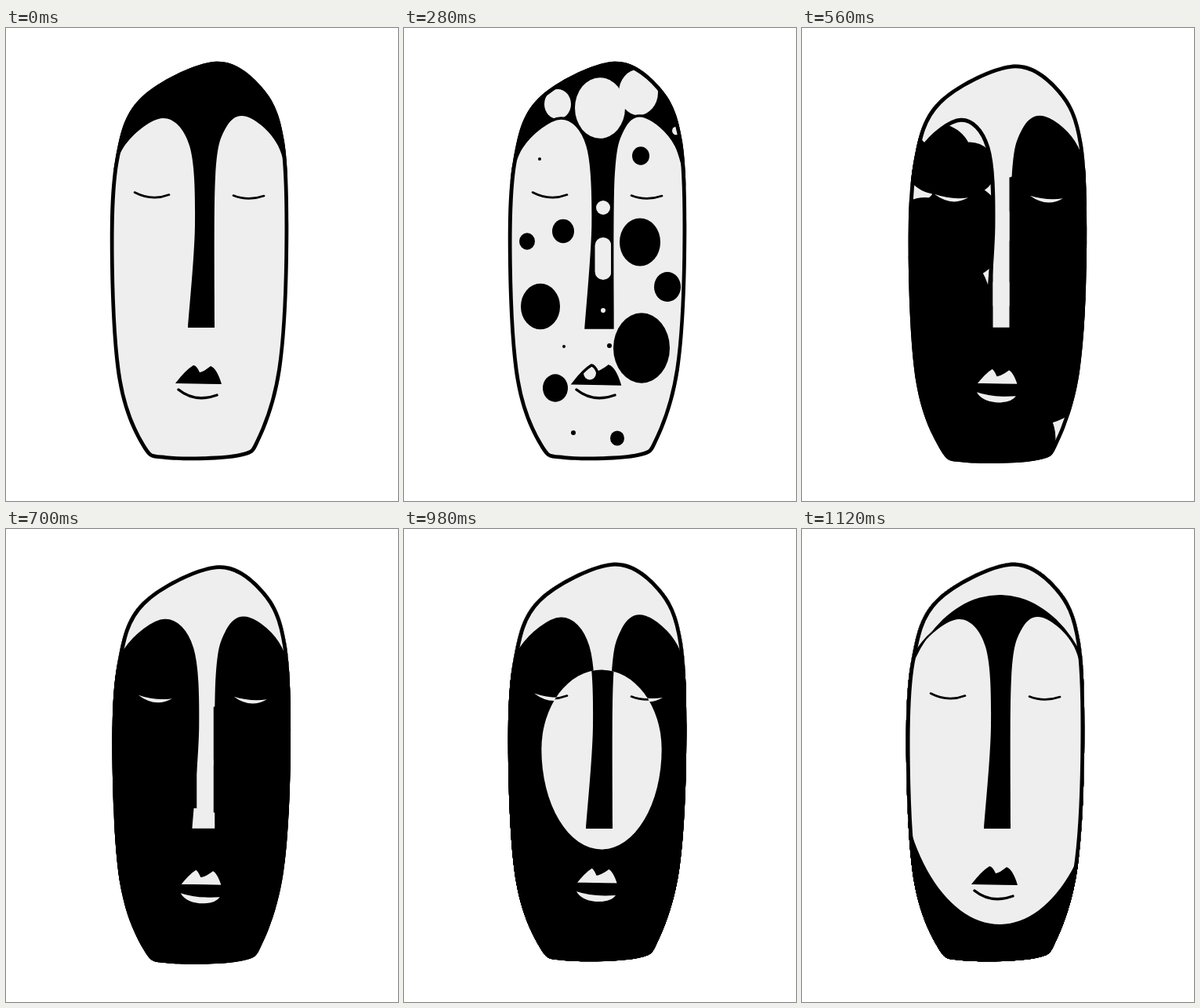
Recreate the animation shown at these times as an HTML page. Size 500 by 603 pixels, loop 1.19 s.

```html
<!DOCTYPE html>
<html lang="en">
<head>
<meta charset="utf-8">
<title>Mask</title>
<style>
  html, body { margin: 0; width: 100%; height: 100%; overflow: hidden; background: #fff; }
  svg { display: block; width: 500px; height: 603px; }
  .light { fill: #eee; }
  .line { fill: none; stroke: #000; stroke-linecap: round; }
</style>
</head>
<body>
<svg viewBox="0 0 500 603">
  <defs>
    <path id="face"/>
    <path id="hair"/>
    <path id="lips" d="M216 453Q229 436 239 430Q243 430 247 439Q252 438 261 431Q269 434 275 454Z"/>
    <g id="marks" class="line">
      <path stroke-width="2.6" d="M164 209.5Q186 221 208 212.5M290 213.5Q309 221 329 214"/>
      <path stroke-width="3.4" d="M220 461Q241 478 269 468"/>
    </g>
    <g id="plain">
      <rect class="light" width="500" height="603"/>
      <use href="#hair"/>
      <use href="#lips"/>
      <use href="#marks"/>
    </g>
    <clipPath id="faceClip"><use href="#face"/></clipPath>
    <clipPath id="featureClip"><use href="#hair"/><use href="#lips"/></clipPath>
    <clipPath id="holeClip"><path id="hole"/></clipPath>
  </defs>
  <g clip-path="url(#faceClip)">
    <rect class="light" width="500" height="603"/>
    <g id="darkSpots"></g>
    <use href="#hair"/>
    <use href="#lips"/>
    <g id="lightSpots" class="light" clip-path="url(#featureClip)"></g>
    <g id="edges" class="line" fill="none">
      <use href="#hair"/>
      <use href="#lips"/>
    </g>
    <use href="#marks"/>
    <path id="lightMarks" class="light" d="M166 209.5Q188 226 209 214Q188 217 166 209.5Z
      M288 211.5Q309 227 330 215Q309 218 288 211.5Z
      M220 462Q240 469 270 467Q264 476 244 475Q226 473 220 462Z"/>
    <use href="#plain" clip-path="url(#holeClip)"/>
    <use href="#face" class="line" stroke-width="9.5"/>
  </g>
</svg>
<script>
const STEP_MS = 70, STEPS = 17, HOLE_START = 10, NOSE_WIDTH = 21;
const $ = id => document.getElementById(id);
const set = (el, attrs) => { for (const k in attrs) el.setAttribute(k, attrs[k]); };

// Smooth curve through a few points
function curve(pts, closed) {
  const n = pts.length;
  const at = i => closed ? pts[(i + n) % n] : pts[Math.max(0, Math.min(n - 1, i))];
  const lean = (p, from, to) => p.map((v, k) => v + (to[k] - from[k]) / 6);
  let d = '';
  for (let i = 0; i < (closed ? n : n - 1); i++) {
    const a = at(i), b = at(i + 1);
    d += `C${lean(a, at(i - 1), b)} ${lean(b, at(i + 2), a)} ${b}`;
  }
  return pts[0] + d;
}

const outline = [
  [265, 43], [326, 75], [355, 145], [360, 290], [351, 435], [325, 523], [298, 547],
  [204, 550], [173, 533], [143, 450], [133, 300], [139, 170], [171, 90]
];
const leftBrow = [[126, 225], [150, 152], [200, 115], [234, 150], [241, 250], [232, 382]];
const rightBrow = [[266, 382], [267, 190], [280, 128], [307, 113], [347, 150], [367, 230]];
set($('face'), { d: `M${curve(outline, true)}Z` });
set($('hair'), { d: `M${curve(leftBrow)}L${curve(rightBrow)}L400 0L100 0Z` });

// Each spot: centre and size halfway through the spread
function addSpots(group, list, maxWidth = Infinity) {
  return list.map(([x, y, size]) => {
    const el = document.createElementNS('http://www.w3.org/2000/svg', 'rect');
    group.append(el);
    return { el, x, y, size, maxWidth };
  });
}
const spots = [
  ...addSpots($('darkSpots'), [
    [173, 167, 2], [214, 179, -9], [302, 163, 11], [343, 201, -9],
    [203, 259, 14], [157, 272, 10], [174, 355, 25], [204, 406, 2],
    [301, 273, 26], [336, 330, 17], [303, 408, 36], [262, 405, 3],
    [193, 459, 16], [216, 516, 3], [272, 523, 9]
  ]),
  ...addSpots($('lightSpots'), [
    [250, 102, 32], [299, 82, 25], [196, 97, 17], [347, 131, 5], [237, 440, 8]
  ]),
  ...addSpots($('lightSpots'), [[254, 229, 9], [254, 294, 27], [254, 360, 3]], NOSE_WIDTH)
];

function drawSpot({ el, x, y, size, maxWidth }, step) {
  const swell = Math.min(1, step / 4) ** 1.5;
  const r = Math.max(0, size * swell + 7 * Math.max(0, step - 4) ** 1.3);
  const narrow = maxWidth < Infinity;
  const rx = Math.min(r, maxWidth / 2);
  const ry = narrow ? r : r * (1 + Math.max(0, size) / 150);
  set(el, {
    x: x - rx, y: y - ry, width: 2 * rx, height: 2 * ry,
    rx, ry: narrow ? rx : ry
  });
}

// Egg-shaped opening that brings the plain face back
function holePath(step) {
  const s = Math.max(0, step - HOLE_START);
  const h = 15.8 * s + 3.2 * s * s;
  const rx = h * (0.77 - 0.025 * s), cx = 252, cy = 294 - 0.114 * h;
  return `M${cx - rx} ${cy}A${rx} ${0.886 * h} 0 0 1 ${cx + rx} ${cy}` +
    `A${rx} ${1.114 * h} 0 0 1 ${cx - rx} ${cy}Z`;
}

function draw(step) {
  const sway = 3 * Math.sin(Math.PI * Math.max(0, Math.min(1, (step - 4) / 9.5)));
  set($('face'), { transform: `translate(${sway} ${1.3 * sway})` });
  for (const id of ['hair', 'lips', 'marks', 'lightMarks']) {
    set($(id), { transform: `translate(${sway} ${0.8 * sway})` });
  }
  for (const spot of spots) drawSpot(spot, step);
  set($('edges'), { 'stroke-width': 5 * Math.min(1, step / 6) });
  set($('lightMarks'), { visibility: step >= 8 ? 'visible' : 'hidden' });
  set($('hole'), { d: holePath(step) });
}

const start = performance.now();
let shown = -1;
function tick() {
  const step = Math.floor((performance.now() - start) / STEP_MS) % STEPS;
  if (step !== shown) draw(shown = step);
  requestAnimationFrame(tick);
}
tick();
</script>
</body>
</html>
```
